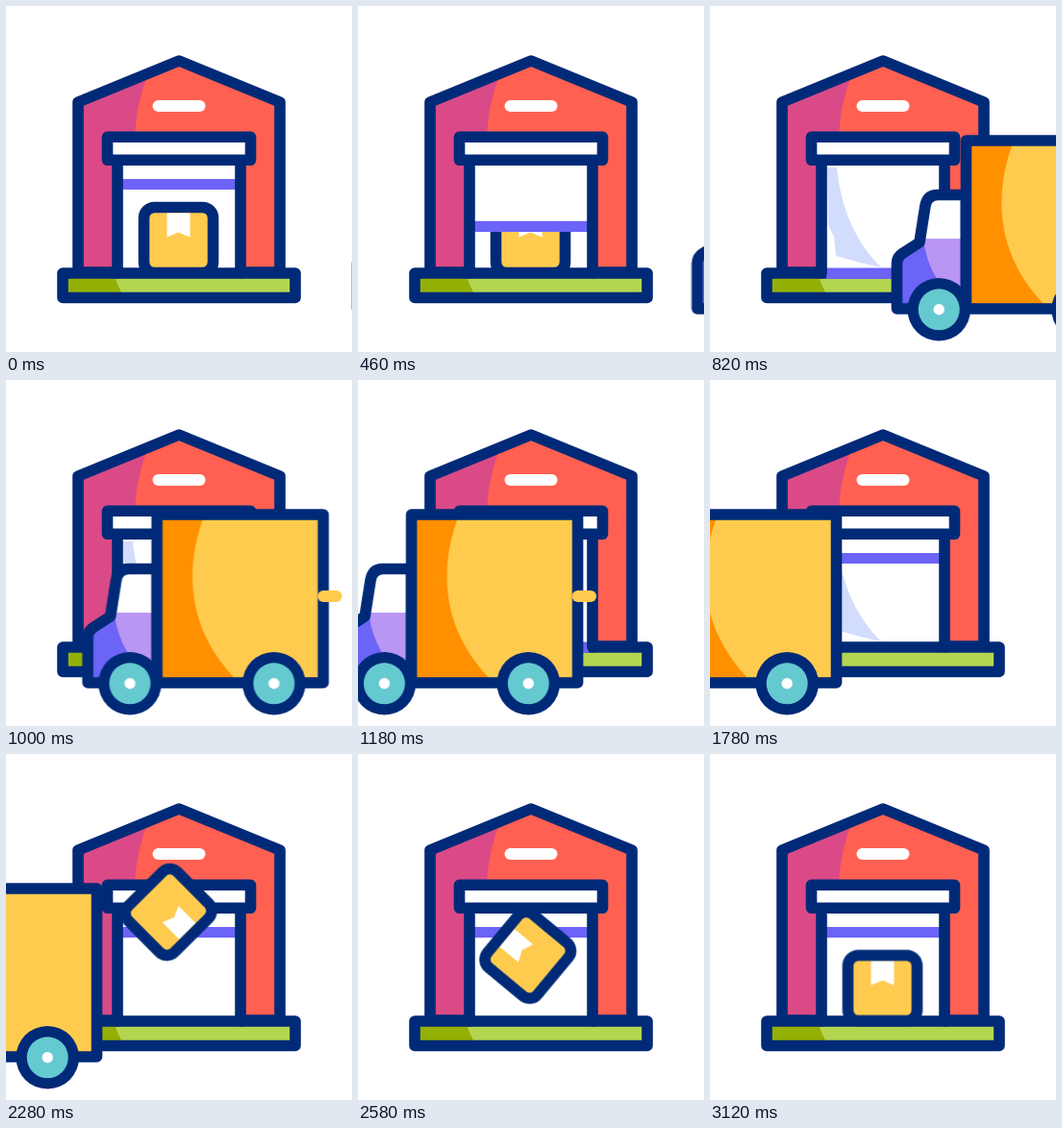
These frames come from a looping animation (360 by 360 pixels, 3.6 s). An HTML page:

```html
<!DOCTYPE html>
<html lang="en">
<head>
<meta charset="utf-8">
<title>Warehouse delivery</title>
<style>
  html, body { margin: 0; width: 100%; height: 100%; overflow: hidden; background: #fff; }
  svg { display: block; width: 100vw; height: 100vh; }

  .line { stroke: #002a77; stroke-width: 11.6; stroke-linejoin: round; stroke-linecap: round; }
  .none { fill: none; }
  .white { fill: #fff; }
  .coral { fill: #ff6052; }
  .pink { fill: #d94a87; }
  .yellow { fill: #ffcb4f; }
  .orange { fill: #ff9000; }
  .violet { fill: #6c63f7; }
  .lilac { fill: #b996f3; }
  .lime { fill: #b3d550; }
  .olive { fill: #94b004; }
  .teal { fill: #65c9d0; }
  .navy { fill: #002a77; }
  .pale { fill: #d2dcfd; }

  .truck, .shutter, .glare, .latch, .stored, .fly, .fly-x, .fly-y, .spin {
    animation: 3.6s linear infinite both;
  }
  .truck { animation-name: drive; }
  .shutter { animation-name: shutter; }
  .glare { animation-name: glare; }
  .latch { animation-name: latch; }
  .stored { animation-name: stored; }
  .fly { animation-name: fly; }
  .fly-x { animation-name: fly-x; }
  .fly-y { animation-name: fly-y; }
  .spin { animation-name: spin; }

  /* The truck arrives, waits to unload, then leaves. */
  @keyframes drive {
    0%, 9.667% { transform: translateX(432px); animation-timing-function: cubic-bezier(.333, 0, .667, 1); }
    42.222% { transform: translateX(-47px); }
    58.222% { transform: translateX(-47px); animation-timing-function: cubic-bezier(.333, 0, .667, 1); }
    76%, 100% { transform: translateX(-230px); }
  }
  @keyframes shutter {
    0%, 6.111% { transform: none; animation-timing-function: cubic-bezier(.333, 0, .667, 1); }
    20% { transform: translateY(92.5px); }
    35.556% { transform: translateY(92.5px); animation-timing-function: cubic-bezier(.333, 0, .667, 1); }
    47.222%, 100% { transform: none; }
  }
  @keyframes glare {
    0%, 13.9% { opacity: 0; }
    20%, 52.8% { opacity: 1; }
    59.7%, 100% { opacity: 0; }
  }
  @keyframes latch {
    0%, 36% { transform: none; }
    42%, 100% { transform: translateX(-26px); visibility: hidden; }
  }
  @keyframes stored {
    0%, 20.5% { visibility: visible; }
    20.51%, 100% { visibility: hidden; }
  }
  @keyframes fly {
    0%, 53.16% { visibility: hidden; }
    53.167%, 100% { visibility: visible; }
  }
  @keyframes fly-x {
    0%, 53.167% { transform: translateX(45px); animation-timing-function: cubic-bezier(.2, .5, .6, 1); }
    63.333% { transform: translateX(169px); }
    71.667% { transform: translateX(176.7px); }
    77.306%, 100% { transform: translateX(179.5px); }
  }
  @keyframes fly-y {
    0%, 53.167% { transform: translateY(228px); animation-timing-function: cubic-bezier(.2, .4, .6, 1); }
    63.333% { transform: translateY(164.5px); animation-timing-function: cubic-bezier(.4, 0, .7, .65); }
    71.667% { transform: translateY(209px); animation-timing-function: cubic-bezier(.3, .45, .65, 1); }
    77.306%, 100% { transform: translateY(243.5px); }
  }
  @keyframes spin {
    0%, 53.417% { transform: rotate(0deg); animation-timing-function: cubic-bezier(.333, 0, .667, 1); }
    77.306%, 100% { transform: rotate(360deg); }
  }
</style>
</head>
<body>
<svg viewBox="0 0 360 360">
  <defs>
    <clipPath id="door"><rect x="121" y="160" width="118.5" height="123.5"/></clipPath>
    <clipPath id="walls"><path d="M75 277V100L180 57 285 100V277Z"/></clipPath>
    <clipPath id="cargo"><rect x="5.5" y="140" width="173" height="175"/></clipPath>
    <clipPath id="cab"><path d="M5.5 315H-66.5V268Q-66.5 261 -60 257L-43 246 -37 208Q-35 196.5 -24 196.5H5.5Z"/></clipPath>
    <g id="box">
      <rect class="line yellow" x="-36" y="-34" width="72" height="68" rx="11"/>
      <path class="white" d="M-12-28H12V-3L0-8-12-3Z"/>
    </g>
    <g id="wheel">
      <circle class="navy" r="32.8"/>
      <circle class="teal" r="21.5"/>
      <circle class="white" r="5.7"/>
    </g>
  </defs>

  <g clip-path="url(#walls)">
    <path class="coral" d="M70 50H290V280H70Z"/>
    <path class="pink" d="M70 50H158Q135 90 134 140V280H70Z"/>
  </g>
  <path class="line none" d="M75 277V100L180 57 285 100V277Z"/>
  <rect class="white" x="152.5" y="98" width="55" height="12" rx="6"/>

  <rect class="white" x="116" y="160" width="128" height="118"/>
  <g class="stored"><use href="#box" x="179.5" y="243.5"/></g>

  <rect class="lime" x="59" y="278" width="242" height="25.5"/>
  <path class="olive" d="M59 278H112Q116 292 123 303H59Z"/>
  <rect class="line none" x="59" y="278" width="242" height="25.5"/>

  <g clip-path="url(#door)">
    <g class="shutter">
      <rect class="white" x="121" y="60" width="119" height="125"/>
      <rect class="violet" x="121" y="180" width="119" height="11"/>
    </g>
    <path class="pale glare" d="M122 168H132C135 205 150 245 178 272L156 267 131 260 129 240 123 228Z"/>
  </g>
  <path class="line none" d="M116 160V278M244 160V278"/>
  <rect class="line white" x="105.5" y="136.3" width="149" height="24"/>

  <g class="fly"><g class="fly-x"><g class="fly-y"><g class="spin">
    <use href="#box"/>
  </g></g></g></g>

  <g class="truck">
    <g clip-path="url(#cab)">
      <rect class="white" x="-72" y="190" width="80" height="53"/>
      <rect class="violet" x="-72" y="242.5" width="80" height="75"/>
      <path class="lilac" d="M-39 242.5H6V315Q-33 290 -39 242.5Z"/>
    </g>
    <path class="line none" d="M5.5 315H-66.5V268Q-66.5 261 -60 257L-43 246 -37 208Q-35 196.5 -24 196.5H5.5Z"/>
    <g clip-path="url(#cargo)">
      <rect class="orange" x="5" y="140" width="174" height="176"/>
      <path class="yellow" d="M55 140C34 195 35 260 91 315H180V140Z"/>
    </g>
    <rect class="line none" x="5.5" y="140" width="173" height="175"/>
    <rect class="yellow latch" x="172.5" y="219" width="25.5" height="12" rx="6"/>
    <use href="#wheel" x="-22.7" y="315.8"/>
    <use href="#wheel" x="127.2" y="315.8"/>
  </g>
</svg>
</body>
</html>
```
